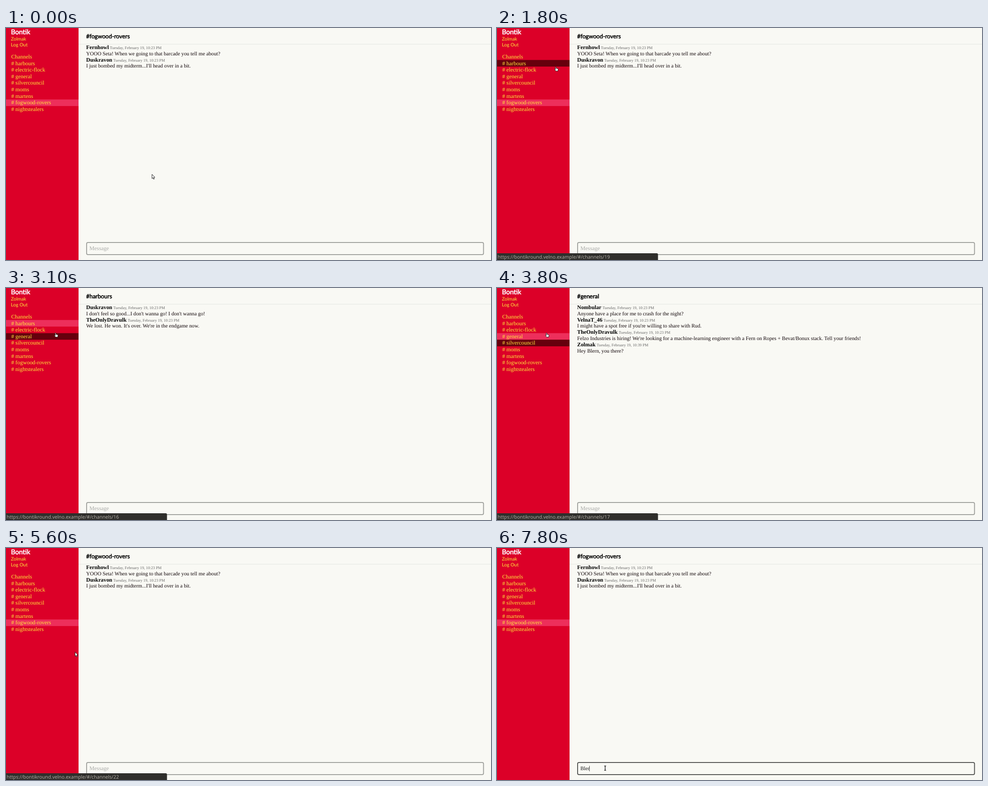
Write an HTML page with a canvas that moves like this. It is 1083 by 517 pixels and loops after 8 s.

```html
<!DOCTYPE html>
<html lang="en">
<head>
<meta charset="utf-8">
<title>Chat channels</title>
<style>
  html, body { margin: 0; width: 100%; height: 100%; overflow: hidden; background: #f9f9f4; }
  canvas { display: block; width: 1083px; height: 517px; }
</style>
</head>
<body>
<canvas id="stage"></canvas>
<script>
const W = 1083, H = 517, LOOP = 8000, STEP = 100;
const SERIF = '"Liberation Serif", "Times New Roman", serif';
const LATO = 'Lato, sans-serif';
const SANS = '"Open Sans", "Noto Sans", sans-serif';
const YELLOW = '#ffeb3b', RED = '#dc0028', PINK = '#ed2f5b', DARK = '#66000d', PAPER = '#f9f9f4';
const ROW_TOP = 71.3, ROW_H = 14.66, PITCH = 27.6;

const channels = [
  ['harbours', 18], ['electric-flock', 19], ['general', 16], ['silvercouncil', 17],
  ['moms', 23], ['martens', 20], ['fogwood-rovers', 21], ['nightstealers', 22]
];
const [HARBOURS, FLOCK, GENERAL, COUNCIL, MOMS, MARTENS, ROVERS, STEALERS] = channels.keys();

const DAY = 'Tuesday, February 19, ';
const rooms = {
  [HARBOURS]: [
    ['Duskravon', '10:23 PM', "I don't feel so good...I don't wanna go! I don't wanna go!"],
    ['TheOnlyDravulk', '10:23 PM', "We lost. He won. It's over. We're in the endgame now."]
  ],
  [GENERAL]: [
    ['Nombular', '10:23 PM', 'Anyone have a place for me to crash for the night?'],
    ['VelnaT_46', '10:23 PM', "I might have a spot free if you're willing to share with Rud."],
    ['TheOnlyDravulk', '10:23 PM', "Felzo Industries is hiring! We're looking for a machine-learning engineer with a Fern on Ropes + Bevat/Bonux stack. Tell your friends!"],
    ['Zolmak', '10:39 PM', 'Hey Blern, you there?']
  ],
  [ROVERS]: [
    ['Fernhowl', '10:23 PM', 'YOOO Seta! When we going to that barcade you tell me about?'],
    ['Duskravon', '10:23 PM', "I just bombed my midterm...I'll head over in a bit."]
  ]
};

// Each track is a list of [start time, value]
const tracks = {
  title: [[0, ROVERS], [2500, HARBOURS], [3300, GENERAL], [4900, ROVERS]],
  room: [[0, ROVERS], [2500, HARBOURS], [3500, GENERAL], [5100, ROVERS]],
  hover: [[0, -1], [1500, STEALERS], [1600, MARTENS], [1700, COUNCIL], [1800, HARBOURS],
    [2800, FLOCK], [3000, GENERAL], [3800, COUNCIL], [4200, MOMS], [4400, MARTENS],
    [4600, ROVERS], [5300, STEALERS], [5600, -1]],
  link: [[0, -1], [1500, STEALERS], [1600, MARTENS], [1700, COUNCIL], [1800, FLOCK],
    [2000, HARBOURS], [2800, FLOCK], [3000, GENERAL], [3800, COUNCIL], [4200, MOMS],
    [4400, MARTENS], [4600, ROVERS], [5300, STEALERS], [5900, -1]],
  border: [[0, '#a0a29e'], [7000, '#7a7b78'], [7100, '#555654']],
  typed: [[0, 0], [7200, 1], [7600, 2], [7700, 3], [7800, 4]]
};

const path = [
  [0, 325.5, 325.5], [300, 342, 420], [500, 334, 505], [700, 262, 440], [900, 215.5, 350],
  [1000, 215.5, 350], [1400, 88.5, 184.5], [1800, 128, 86], [1900, 128, 86], [2200, 120.5, 78],
  [2600, 120.5, 78], [3100, 107.5, 99.5], [3900, 107.5, 99.5], [4800, 135.5, 162.5],
  [5400, 135.5, 162.5], [5800, 172, 300], [6200, 236, 468], [6300, 241.5, 490.5]
];

const canvas = document.getElementById('stage');
const ctx = canvas.getContext('2d');
const dpr = window.devicePixelRatio || 1;
canvas.width = Math.round(W * dpr);
canvas.height = Math.round(H * dpr);

function at(track, t) {
  let value = track[0][1];
  for (const [start, v] of track) if (t >= start) value = v;
  return value;
}

function pointer(t) {
  const i = path.findIndex(p => p[0] > t);
  if (i < 0) return path[path.length - 1].slice(1);
  const [t0, x0, y0] = path[i - 1], [t1, x1, y1] = path[i];
  const k = (t - t0) / (t1 - t0);
  return [x0 + (x1 - x0) * k, y0 + (y1 - y0) * k];
}

function rect(x, y, w, h, color) {
  ctx.fillStyle = color;
  ctx.fillRect(x, y, w, h);
}

// Returns the x where the text ends
function text(str, x, y, size, color, family = SERIF, weight = 400) {
  ctx.font = `${weight} ${size}px ${family}`;
  ctx.fillStyle = color;
  ctx.fillText(str, x, y);
  return x + ctx.measureText(str).width;
}

function heavyText(str, x, y, size, color) {
  text(str, x, y, size, color, LATO);
  ctx.strokeStyle = color;
  ctx.lineWidth = size / 23;
  ctx.strokeText(str, x, y);
}

function sidebar(selected, hovered) {
  rect(0, 0, 162, H, RED);
  heavyText('Bontik', 11, 14.3, 15, '#fff');
  text('Zolmak', 11, 28.2, 10.56, YELLOW, LATO);
  text('Log Out', 11, 40.7, 10.56, YELLOW, LATO);
  text('Channels', 11.73, 67.8, 12.46, YELLOW);
  channels.forEach(([name], i) => {
    const y = ROW_TOP + ROW_H * i;
    if (i === selected) rect(0, y, 162, ROW_H, PINK);
    else if (i === hovered) rect(0, y, 162, ROW_H, DARK);
    text('# ' + name, 11.73, y + 11.2, 12.46, YELLOW);
  });
}

function messages(list) {
  list.forEach(([name, time, body], i) => {
    const y = 47.1 + PITCH * i;
    const end = text(name, 179, y, 12.32, '#000', SERIF, 700);
    text(DAY + time, end + 2.4, y, 8.8, '#666');
    text(body, 179, y + 13.6, 11.73, '#100508');
  });
}

function inputBox(t) {
  ctx.strokeStyle = at(tracks.border, t);
  ctx.lineWidth = 2;
  ctx.beginPath();
  ctx.roundRect(180, 478, 886.3, 27, 3);
  ctx.stroke();
  const count = at(tracks.typed, t);
  let end = 186.2;
  if (count) end = text('Blern'.slice(0, count), end, 495.2, 11.73, '#111');
  else text('Message', end, 495.2, 12.46, '#a9aaa7');
  if (t >= 7000) rect(end - 0.2, 485.5, 0.8, 12, '#111');
}

function statusBar(row) {
  if (row < 0) return;
  ctx.fillStyle = '#2f2e2b';
  ctx.beginPath();
  ctx.roundRect(-4, 502, 363.5, 20, 3);
  ctx.fill();
  text('https://bontikround.velno.example/#/channels/' + channels[row][1], 1.6, 513.7, 10.75, '#b8b4ab', SANS);
}

const ARROW = new Path2D('M.5 .5V10L2.7 8.1 4.2 11.4 5.7 10.7 4.2 7.4H7Z');
const HAND = new Path2D('M2 1.3Q3 .1 3.9 1.3L4.4 4 7.6 4.6Q8.8 5 8.6 6.2L7.8 10H3.7L.9 7Q.1 5.6 1.7 5.7L2.8 6.4Z');
const BEAM = new Path2D('M-2-5Q0-5 0-3.7Q0-5 2-5M0-4V4M-2 5Q0 5 0 3.7Q0 5 2 5');

function cursor(t) {
  if (t >= 6300 && t < 6400) return;
  const [x, y] = pointer(t);
  ctx.save();
  ctx.translate(x, y);
  ctx.lineJoin = 'round';
  if (x > 179 && y > 477 && y < 504) {
    ctx.strokeStyle = '#222';
    ctx.lineWidth = 1.5;
    ctx.stroke(BEAM);
  } else {
    const shape = x < 160 && y > 70 && y < 200 ? HAND : ARROW;
    ctx.fillStyle = '#fff';
    ctx.strokeStyle = '#1c1c1c';
    ctx.lineWidth = 1;
    ctx.fill(shape);
    ctx.stroke(shape);
  }
  ctx.restore();
}

function draw(t) {
  ctx.setTransform(dpr, 0, 0, dpr, 0, 0);
  ctx.textRendering = 'geometricPrecision';
  ctx.textBaseline = 'alphabetic';
  ctx.lineJoin = 'round';
  rect(0, 0, W, H, PAPER);
  const room = at(tracks.room, t);
  sidebar(room, at(tracks.hover, t));
  rect(162, 35.6, W - 162, 0.9, '#dfe1dd');
  heavyText('#' + channels[at(tracks.title, t)][0], 179, 23, 12.9, '#000');
  messages(rooms[room]);
  inputBox(t);
  statusBar(at(tracks.link, t));
  cursor(t);
}

const start = performance.now();
function frame() {
  const t = (performance.now() - start) % LOOP;
  draw(Math.floor(t / STEP) * STEP);
  requestAnimationFrame(frame);
}
frame();
</script>
</body>
</html>
```
